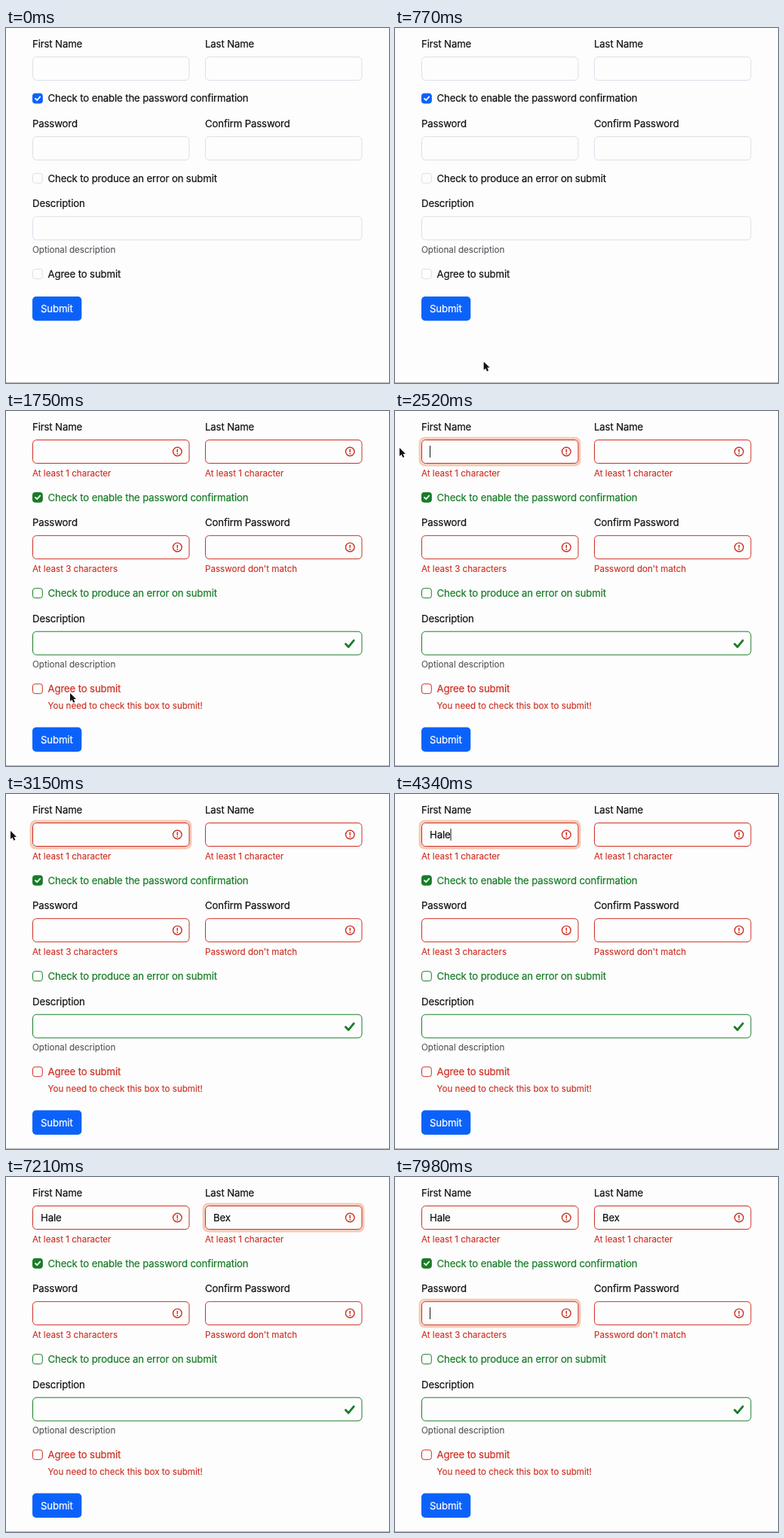
Write an HTML page that moves like this. It is 508 by 472 pixels and loops after 8000 ms.

```html
<!DOCTYPE html>
<html lang="en">
<head>
<meta charset="utf-8">
<title>Form validation</title>
<style>
  html, body { margin: 0; width: 100%; height: 100%; overflow: hidden; background: #fdfdfd; }
  svg { display: block; width: 100%; height: 100%; }
  text { font: 13.2px Inter, Roboto, sans-serif; letter-spacing: -0.14px; white-space: pre; stroke-width: 0.22px; }
  text.small { font-size: 11.6px; letter-spacing: 0; stroke-width: 0.12px; }
</style>
</head>
<body>
<svg id="stage" viewBox="0 0 508 472"></svg>
<script>
const LOOP = 8000, SUBMITTED = 1610, HIDE_CURSOR = 3480, FADE = 150, BLINK = 565;
const PAPER = '#fdfdfd', INK = '#101214', MUTED = '#55585a', RED = '#cd2f22', GREEN = '#187d27',
      BLUE = '#0b62fb', BLUE_HOVER = '#0a54cd', PALE = '#dcdfea';

// Focus periods and keystroke times of each control
const focus = { first: [2310, 4480], last: [4480, 7400], check: [7400, 7700], password: [7700, LOOP] };
const typing = {
  first: ['Hale', [3500, 3640, 3800, 3940]],
  last: ['Bex', [4680, 4820, 4960]]
};
const cursorPath = [
  [0, 140, 490], [500, 140, 490], [1120, 85, 376], [1650, 85, 375.5], [1750, 85, 375],
  [2260, 64, 52], [2330, 64, 52], [2510, 6, 49], [HIDE_CURSOR, 6, 49]
];

const stage = document.getElementById('stage');
const clamp = v => Math.max(0, Math.min(1, v));
const ease = v => v * v * (3 - 2 * v);

const text = (x, y, str, fill = INK, cls = '') =>
  `<text x="${x}" y="${y}" fill="${fill}" stroke="${fill}" class="${cls}">${str}</text>`;
const rect = (x, y, w, h, r, attrs) =>
  `<rect x="${x}" y="${y}" width="${w}" height="${h}" rx="${r}" ${attrs}/>`;
const line = (d, color, width) =>
  `<path d="${d}" fill="none" stroke="${color}" stroke-width="${width}" stroke-linecap="round" stroke-linejoin="round"/>`;

function glow(id, t, x, y, w, h, color) {
  const [start, end] = focus[id] || [LOOP, LOOP];
  const alpha = clamp((t - start) / FADE) * (1 - clamp((t - end) / FADE));
  return alpha ? rect(x - 1.7, y - 1.7, w + 3.4, h + 3.4, 6,
    `fill="none" stroke="${color}" stroke-width="3.4" opacity="${alpha}"`) : '';
}

function alertIcon(x, y) {
  return `<circle cx="${x}" cy="${y}" r="5.8" fill="none" stroke="${RED}" stroke-width="1.4"/>` +
    line(`M${x} ${y - 2.8}v3.2`, RED, 1.5) +
    `<circle cx="${x}" cy="${y + 2.8}" r="0.9" fill="${RED}"/>`;
}

const pen = document.createElement('canvas').getContext('2d');
function measure(str) {
  pen.font = '13.2px Inter, Roboto, sans-serif';
  return pen.measureText(str).width - 0.14 * str.length;
}

function entry(id, t, x, y) {
  const [word, keys] = typing[id] || ['', []];
  const pressed = keys.filter(k => t >= k);
  const typed = word.slice(0, pressed.length);
  const [start, end] = focus[id] || [LOOP, LOOP];
  const since = t - (pressed.length ? pressed[pressed.length - 1] : start);
  const caret = t >= start && t < end && since % (2 * BLINK) < BLINK;
  return text(x + 11, y + 21, typed) +
    (caret ? line(`M${x + 11.5 + measure(typed)} ${y + 8.5}v15`, INK, 1) : '');
}

function field(id, t, x, y, label, error) {
  const failed = t >= SUBMITTED;
  return text(x, y - 12, label) +
    glow(id, t, x, y, 208, 32, '#f6cbb8') +
    rect(x + 0.5, y + 0.5, 207.5, 31, 5, `fill="${PAPER}" stroke="${failed ? RED : PALE}"`) +
    entry(id, t, x, y) +
    (failed ? alertIcon(x + 192.3, y + 16) + text(x, y + 48.5, error, RED, 'small') : '');
}

function checkbox(id, t, y, label, checked, color) {
  const failed = t >= SUBMITTED;
  const accent = failed ? color : checked ? BLUE : PALE;
  return glow(id, t, 35, y - 7, 14, 14, '#c5dfc4') +
    rect(35.5, y - 6.5, 12.8, 12.8, 3, `fill="${checked ? accent : PAPER}" stroke="${accent}"`) +
    (checked ? line(`M39 ${y + 0.1}l2.2 2.2 4-4.6`, '#fff', 1.8) : '') +
    text(55.5, y + 4.7, label, failed ? color : INK);
}

function button(t, y) {
  const hover = t < SUBMITTED ? clamp((t - 1060) / FADE) : 0;
  return rect(35, y, 65.3, 32.3, 5, `fill="${BLUE}"`) +
    rect(35, y, 65.3, 32.3, 5, `fill="${BLUE_HOVER}" opacity="${hover}"`) +
    text(46, y + 21, 'Submit', '#fff');
}

function cursorAt(t) {
  const i = cursorPath.findIndex(p => p[0] > t);
  const [t0, x0, y0] = cursorPath[i - 1], [t1, x1, y1] = cursorPath[i];
  const k = ease((t - t0) / (t1 - t0));
  return [x0 + (x1 - x0) * k, y0 + (y1 - y0) * k];
}

function cursor(t, inputTops, buttonTop) {
  if (t >= HIDE_CURSOR) return '';
  const [x, y] = cursorAt(t);
  const overButton = x >= 35 && x <= 100 && y >= buttonTop && y <= buttonTop + 32;
  const overInput = x >= 35 && x <= 243 && inputTops.some(top => y >= top && y <= top + 32);
  let shape;
  if (overButton) {
    shape = `<path d="M-2 1.2Q-1.2-.8.4.4L2.2 4.6Q3.4 3.8 4 5Q5.4 4.4 5.9 5.6Q7.3 5.4 7.6 7L8.2 10L7.2 13H1.6L-3.6 8.4Q-4.4 6.9-2.6 6.7L-.4 7.6Z"
      fill="#fff" stroke="#111" stroke-width="1.1" stroke-linejoin="round"/>` +
      line('M2.6 8.4l.7 2.6M4.5 8.2l.6 2.6', '#111', 0.7);
  } else if (overInput) {
    const beam = 'M-2-7Q0-7 0-5V5Q0 7-2 7M2-7Q0-7 0-5M0 5Q0 7 2 7';
    shape = line(beam, '#fff', 2.6) + line(beam, '#111', 1.1);
  } else {
    shape = '<path d="M0 0V11L2.5 8.7L4.3 12.8L6.4 11.9L4.6 7.9H8Z" fill="#111" stroke="#fff" stroke-width="1.6" stroke-linejoin="round" paint-order="stroke"/>';
  }
  return `<g transform="translate(${x} ${y})">${shape}</g>`;
}

function draw(t) {
  const failed = t >= SUBMITTED;
  const row = failed ? 21.2 : 0;       // each error line pushes the rows below it down
  const secondTop = 144 + row, textTop = 250.3 + 2 * row, buttonTop = 357 + 3 * row;
  stage.innerHTML =
    field('first', t, 35, 38, 'First Name', 'At least 1 character') +
    field('last', t, 264, 38, 'Last Name', 'At least 1 character') +
    checkbox('toggle', t, 93.7 + row, 'Check to enable the password confirmation', true, GREEN) +
    field('password', t, 35, secondTop, 'Password', 'At least 3 characters') +
    field('confirm', t, 264, secondTop, 'Confirm Password', "Password don't match") +
    checkbox('check', t, 199.9 + 2 * row, 'Check to produce an error on submit', false, GREEN) +
    text(35, textTop - 12, 'Description') +
    rect(35.5, textTop + 0.5, 436.5, 31, 5, `fill="none" stroke="${failed ? GREEN : PALE}"`) +
    (failed ? line(`M450.5 ${textTop + 17}l3.8 4 7-8.6`, GREEN, 2.8) : '') +
    text(35, textTop + 48.7, 'Optional description', MUTED, 'small') +
    checkbox('agree', t, 327 + 2 * row, 'Agree to submit', false, RED) +
    (failed ? text(55.5, 396, 'You need to check this box to submit!', RED, 'small') : '') +
    button(t, buttonTop) +
    line('M0 471.5H508', '#b4b5b4', 1) +
    cursor(t, [38, secondTop, textTop], buttonTop);
}

const began = performance.now();
function tick() {
  draw((performance.now() - began) % LOOP);
  requestAnimationFrame(tick);
}
tick();
</script>
</body>
</html>
```
